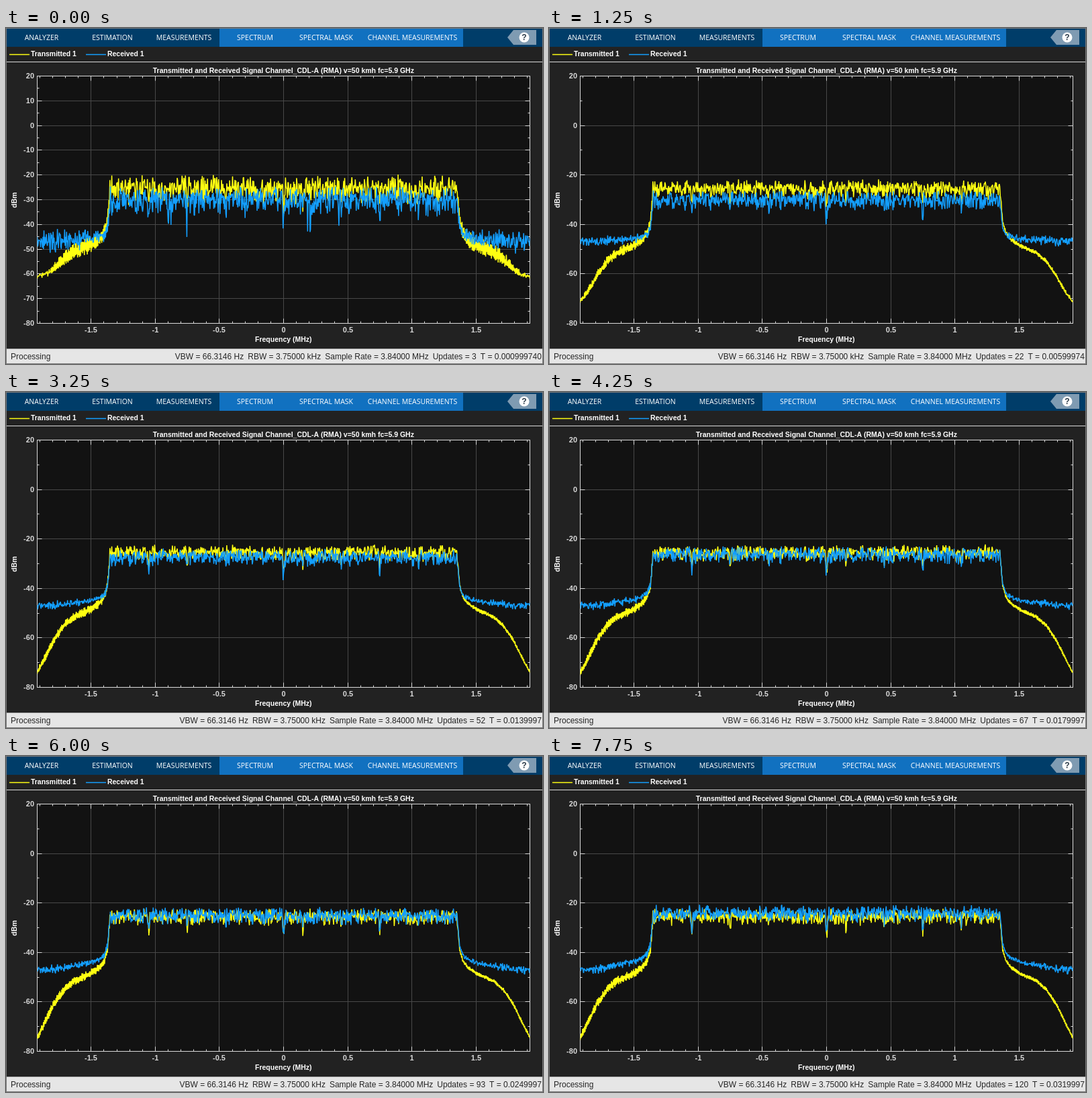
An HTML page with a canvas for the animation above (8000 ms loop, 800 by 500 pixels).

```html
<!DOCTYPE html>
<html lang="en">
<head>
<meta charset="utf-8">
<title>Spectrum analyzer</title>
<style>
  html, body { margin: 0; width: 100%; height: 100%; overflow: hidden; background: #222; }
  canvas { display: block; }
</style>
</head>
<body>
<canvas id="stage" width="800" height="500"></canvas>
<script>
const ctx = document.getElementById('stage').getContext('2d');
const STEPS = 32, STEP_MS = 250, BINS = 1024;
const PLOT = { left: 46.5, right: 780.5, top: 71.5, bottom: 439.5 };
const PX_PER_MHZ = (PLOT.right - PLOT.left) / 3.84;
const YELLOW = '#ffff11', BLUE = '#139fff';
const SANS = '"Liberation Sans", Arial, sans-serif';

const xOf = mhz => PLOT.left + (mhz + 1.92) * PX_PER_MHZ;
const yOf = dbm => PLOT.top + (20 - dbm) * 3.68;

// Piecewise linear curve through [x, y] points
function curve(points, x) {
  let k = 1;
  while (k < points.length - 1 && x > points[k][0]) k++;
  const [x0, y0] = points[k - 1], [x1, y1] = points[k];
  return y0 + (y1 - y0) * Math.min(1, Math.max(0, (x - x0) / (x1 - x0)));
}

// Repeatable noise in -1..1
function noise(a, b) {
  const v = Math.sin(a * 12.9898 + b * 78.233) * 43758.5453;
  return 2 * (v - Math.floor(v)) - 1;
}

const addPower = (a, b) => 10 * Math.log10(10 ** (a / 10) + 10 ** (b / 10));

const SKIRT = [[0, -29], [3, -39], [8, -43.5], [15, -46], [28, -48.5], [53, -51.5], [68, -55], [83, -61], [107, -74.5]];
const NOTCHES = [[-1.05, 6], [-.75, 4], [-.45, 2.5], [-.15, 4], [0, 8], [.15, 5], [.45, 4], [.75, 7], [1.05, 3]];
const RX_LEVEL = [[0, -30], [5, -30], [9, -28.6], [13, -27.3], [17, -26.2], [24, -25], [31, -24.1]];
const TX_FLOOR = [[0, -61], [5, -73], [13, -80], [31, -86]];

function notchDepth(mhz) {
  let depth = 0;
  for (const [center, d] of NOTCHES) {
    const width = center ? .005 : .008;
    depth += d * Math.exp(-(((mhz - center) / width) ** 2));
  }
  return depth;
}

function level(bin, mhz, step, received) {
  const beyond = (Math.abs(mhz) - 1.357) * PX_PER_MHZ;
  const seed = received ? 5000 : 0;
  const wobble = .8 * noise(bin + seed, 1) + .6 * noise(bin + seed, step + 2);
  const settle = (first, later) => curve([[0, first], [4, later * 1.15], [12, later]], step);
  const rx = curve(RX_LEVEL, step);

  if (beyond < 0) {
    const swing = received ? settle(4.2, 2.5) : settle(4.1, 2.4);
    const fade = received && step < 3 && noise(bin, 99) > .98 ? (3 - step) * 3 : 0;
    return (received ? rx : -25.5) + swing * wobble * (wobble < 0 ? 1.2 : 1) - notchDepth(mhz) - fade;
  }
  // Neighbouring bins alternate along the skirts, most strongly on the left
  const zigzag = (bin % 2 ? 1 : -1) * (.75 + .4 * noise(bin, step + 2));
  const ripple = settle(3.2, mhz < 0 ? 1.6 : .75) * zigzag;
  const skirt = curve(SKIRT, beyond) + ripple;
  return received
    ? addPower(-46.9 + settle(3.8, 1.5) * wobble, skirt + rx + 26)
    : addPower(skirt, curve(TX_FLOOR, step) + wobble);
}

function text(str, x, y, font, color, align = 'left') {
  ctx.font = font;
  ctx.fillStyle = color;
  ctx.textAlign = align;
  ctx.fillText(str, x, y);
}

function rect(color, x, y, w, h) {
  ctx.fillStyle = color;
  ctx.fillRect(x, y, w, h);
}

function line(color, width, ...points) {
  ctx.strokeStyle = color;
  ctx.lineWidth = width;
  ctx.beginPath();
  points.forEach(([x, y]) => ctx.lineTo(x, y));
  ctx.stroke();
}

function drawToolbar() {
  rect('#003d69', 0, 0, 800, 28);
  rect('#1171c0', 318, 0, 363, 28);
  const tabs = [['ANALYZER', 53], ['ESTIMATION', 158.5], ['MEASUREMENTS', 265], ['SPECTRUM', 371],
    ['SPECTRAL MASK', 477], ['CHANNEL MEASUREMENTS', 605.5]];
  for (const [name, x] of tabs) text(name, x, 18, '500 10.5px "Open Sans", sans-serif', '#fff', 'center');

  ctx.fillStyle = '#7f9bb2';
  ctx.beginPath();
  [[747, 14], [756, 3], [790, 3], [790, 25], [756, 25]].forEach(([x, y]) => ctx.lineTo(x, y));
  ctx.fill();
  ctx.fillStyle = '#fff';
  ctx.beginPath();
  ctx.arc(772, 14, 7.5, 0, 7);
  ctx.fill();
  text('?', 772, 18, `bold 12px ${SANS}`, '#2b3a48', 'center');
}

function drawLegend() {
  const font = `bold 10.45px ${SANS}`;
  line(YELLOW, 1.5, [5, 39.5], [35, 39.5]);
  text('Transmitted 1', 37, 42, font, '#fff');
  line(BLUE, 1.5, [119, 39.5], [149, 39.5]);
  text('Received 1', 151, 42, font, '#fff');
  line('#d9d9d9', 1, [0, 50.5], [800, 50.5]);
}

function drawAxes(step) {
  const { left, right, top, bottom } = PLOT;
  const title = `bold 10.5px ${SANS}`, label = `bold 11px ${SANS}`;
  const ink = '#d9d9d9', grid = '#484848';
  const yStep = step === 0 ? 10 : 20;
  const snap = v => Math.floor(v) + .5;
  const xTick = (x, n) => {
    line(ink, 1, [x, bottom], [x, bottom - n]);
    line(ink, 1, [x, top], [x, top + n]);
  };
  const yTick = (y, n) => {
    line(ink, 1, [left, y], [left + n, y]);
    line(ink, 1, [right, y], [right - n, y]);
  };

  rect('#121212', left, top, right - left, bottom - top);
  for (let k = -19; k <= 19; k++) {
    const x = snap(xOf(k / 10));
    if (k % 5) { xTick(x, 3); continue; }
    line(grid, 1, [x, top], [x, bottom]);
    xTick(x, 7);
    text(String(k / 10), x, 453, label, ink, 'center');
  }
  for (let db = -80; db <= 20; db += yStep / 2) {
    const y = snap(yOf(db));
    if (db % yStep) { yTick(y, 3); continue; }
    line(grid, 1, [left, y], [right, y]);
    yTick(y, 7);
    text(String(db), 42, y + 3.5, label, ink, 'right');
  }
  ctx.strokeStyle = ink;
  ctx.strokeRect(left, top, right - left, bottom - top);

  text('Transmitted and Received Signal Channel_CDL-A (RMA) v=50 kmh fc=5.9 GHz', 413.3, 67, title, '#fff', 'center');
  text('Frequency (MHz)', 413.3, 467, title, '#fff', 'center');
  ctx.save();
  ctx.translate(16, 256);
  ctx.rotate(-Math.PI / 2);
  text('dBm', 0, 0, title, '#fff', 'center');
  ctx.restore();
}

function drawTrace(step, received) {
  const points = [];
  for (let bin = 0; bin <= BINS; bin++) {
    const mhz = -1.92 + 3.84 * bin / BINS;
    points.push([xOf(mhz), yOf(level(bin, mhz, step, received))]);
  }
  line(received ? BLUE : YELLOW, 1.5, ...points);
}

function drawStatus(step) {
  const font = `12px ${SANS}`, ink = '#262626';
  const time = (step + 1) / 1000 - 2.6e-7;
  const fields = ['VBW = 66.3146 Hz', 'RBW = 3.75000 kHz', 'Sample Rate = 3.84000 MHz',
    `Updates = ${Math.floor((step + 1) * 3.75)}`, `T = ${time.toPrecision(6)}`];
  rect('#e6e6e6', 0, 477, 800, 23);
  line('#a6a6a6', 1, [0, 477.5], [800, 477.5]);
  text('Processing', 7, 493, font, ink);
  let x = 797.8;
  for (const field of fields.reverse()) {
    text(field, x, 493, font, ink, 'right');
    x -= ctx.measureText(field).width + 6;
  }
}

function draw(step) {
  rect('#222', 0, 0, 800, 500);
  drawToolbar();
  drawLegend();
  drawAxes(step);
  ctx.save();
  ctx.beginPath();
  ctx.rect(PLOT.left, PLOT.top, PLOT.right - PLOT.left, PLOT.bottom - PLOT.top);
  ctx.clip();
  ctx.lineJoin = 'bevel';
  drawTrace(step, false);
  drawTrace(step, true);
  ctx.restore();
  drawStatus(step);
  ctx.strokeStyle = '#787878';
  ctx.lineWidth = 1;
  ctx.strokeRect(.5, .5, 799, 499);
}

let shown = -1;
function tick() {
  const step = Math.floor(performance.now() / STEP_MS) % STEPS;
  if (step !== shown) draw(shown = step);
  requestAnimationFrame(tick);
}
tick();
</script>
</body>
</html>
```
